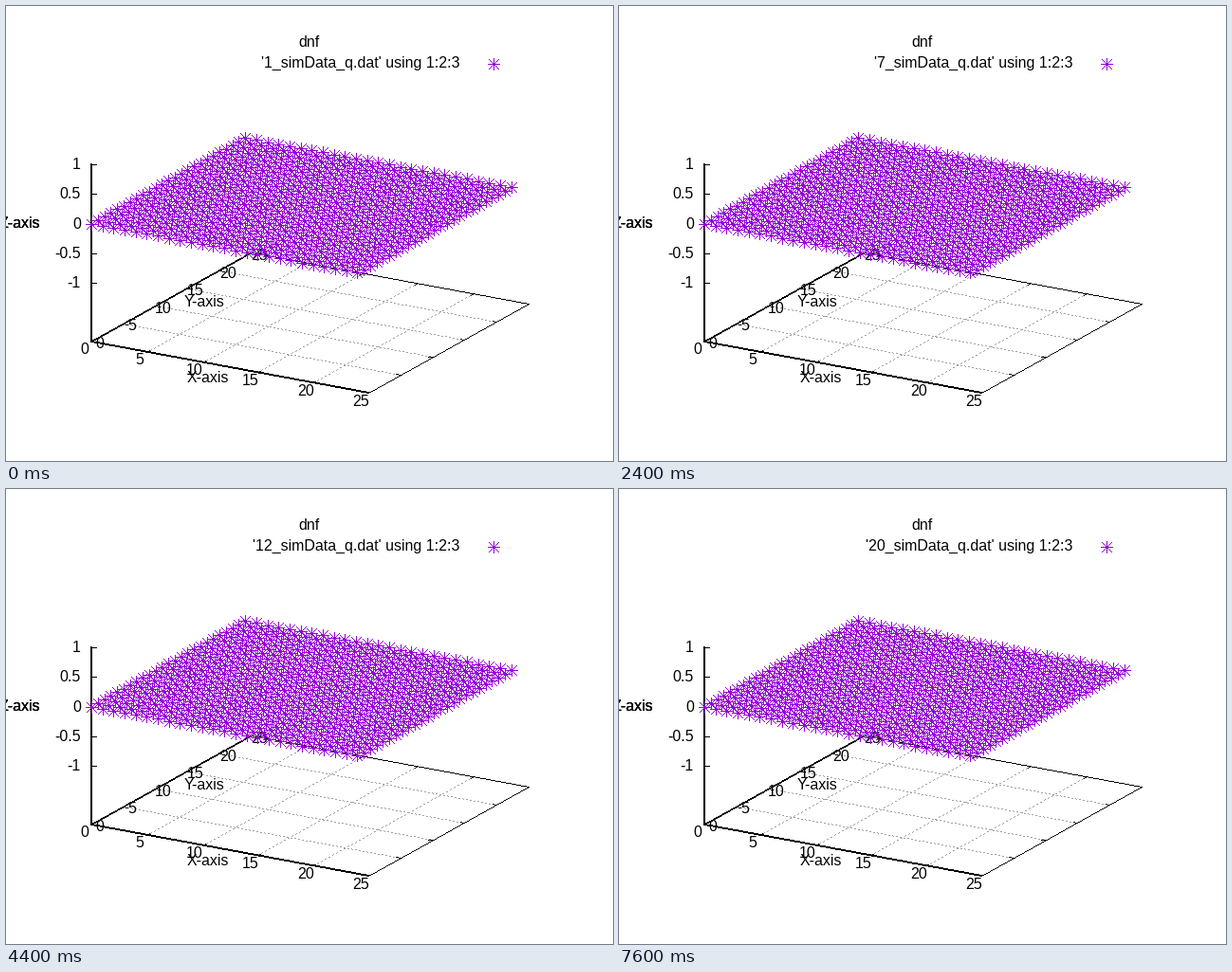
Recreate the animation shown at these times as a matplotlib script. Size 640x480 px, loop 8 s.

```python
import matplotlib.pyplot as plt
import numpy as np
from matplotlib.animation import FuncAnimation

plt.rcParams["font.family"] = "Liberation Sans"
plt.rcParams["text.hinting"] = "default"
plt.rcParams["text.hinting_factor"] = 8

W, H, DPI = 640, 480, 80
FONT_SIZE = 16 * 72 / DPI
BLACK, PURPLE, GRAY = (0, 0, 0), (148, 0, 211), (160, 160, 160)
ORIGIN = np.array([90, 354])
X_STEP = np.array([292, 54]) / 25
Y_STEP = np.array([169, -94]) / 25
Z_ZERO, Z_UNIT = 229.5, 62.5

fig = plt.figure(figsize=(W / DPI, H / DPI), dpi=DPI, facecolor="white")
ax = fig.add_axes([0, 0, 1, 1])
ax.axis("off")


def layer():
    return np.zeros((H, W, 4), np.uint8)


def show(canvas, z):
    ax.imshow(canvas, extent=(0, W, H, 0), interpolation="nearest",
              aspect="auto", zorder=z)


def base(x, y):
    return ORIGIN + x * X_STEP + y * Y_STEP


def line(canvas, a, b, color=BLACK, thick=1, dash=0):
    """Draw a crisp line, thickened up or left across its main direction."""
    a, b = np.rint(a), np.rint(b)
    steps = int(max(abs(b - a)))
    t = np.arange(steps + 1)
    points = np.floor(a + np.outer(t / steps, b - a) + .5).astype(int)
    if dash:
        points = points[t // dash % 2 == 0]
    steep = abs(b[1] - a[1]) > abs(b[0] - a[0])
    for k in range(thick):
        x, y = (points - ((k, 0) if steep else (0, k))).T
        canvas[y, x] = (*color, 255)


def star(canvas, center):
    for d in ((6, 0), (0, 6), (5, 5), (5, -5)):
        line(canvas, center - np.array(d), center + np.array(d), PURPLE)


def label(x, y, text, ha="center"):
    return ax.text(x, y, text, ha=ha, va="baseline", fontsize=FONT_SIZE, zorder=2)


# Floor and axes
floor = layer()
for t in range(5, 25, 5):
    line(floor, base(t, 0), base(t, 25), GRAY, dash=2)
    line(floor, base(0, t), base(25, t), GRAY, dash=2)
line(floor, base(25, 0), base(25, 25))
line(floor, base(0, 25), base(25, 25))
line(floor, base(0, 0), base(25, 0), thick=2)
line(floor, base(0, 0), base(0, 25), thick=2)
line(floor, (90, 166), (90, 354), thick=2)

for i in range(6):
    t = 5 * i
    label(82.5 + 58.3 * i, 367 + 11 * i, str(t))
    label(98.5 + 33.8 * i, 361 - 18.6 * i, str(t))
    for edge, inward in ((0, .4), (25, 24.6)):
        line(floor, base(edge, t), base(inward, t))
        line(floor, base(t, edge), base(t, inward))
for z in (1, .5, 0, -.5, -1):
    y = round(Z_ZERO - z * Z_UNIT)
    line(floor, (90, y), (95, y))
    label(79, y + 5, f"{z:g}", "right")

label(212.5, 397, "X-axis")
label(209, 317, "Y-axis")
for _ in range(3):
    label(14.5, 234, "Z-axis")
label(319.5, 43, "dnf")
title = label(269, 65, "", "left")

# Flat sheet of star markers, with its key
sheet = layer()
for x in range(25):
    for y in range(25):
        star(sheet, np.rint(base(x, y) + (0, Z_ZERO - ORIGIN[1])))
star(sheet, np.array([514, 61]))

show(floor, 1)
show(sheet, 3)
ax.set(xlim=(0, W), ylim=(H, 0))


def update(frame):
    n = frame + 1
    title.set_text(f"'{n}_simData_q.dat' using 1:2:3")
    title.set_x(269 if n < 10 else 260)
    return [title]


anim = FuncAnimation(fig, update, frames=20, interval=400, repeat=True,
                     repeat_delay=0)
plt.show()
```
